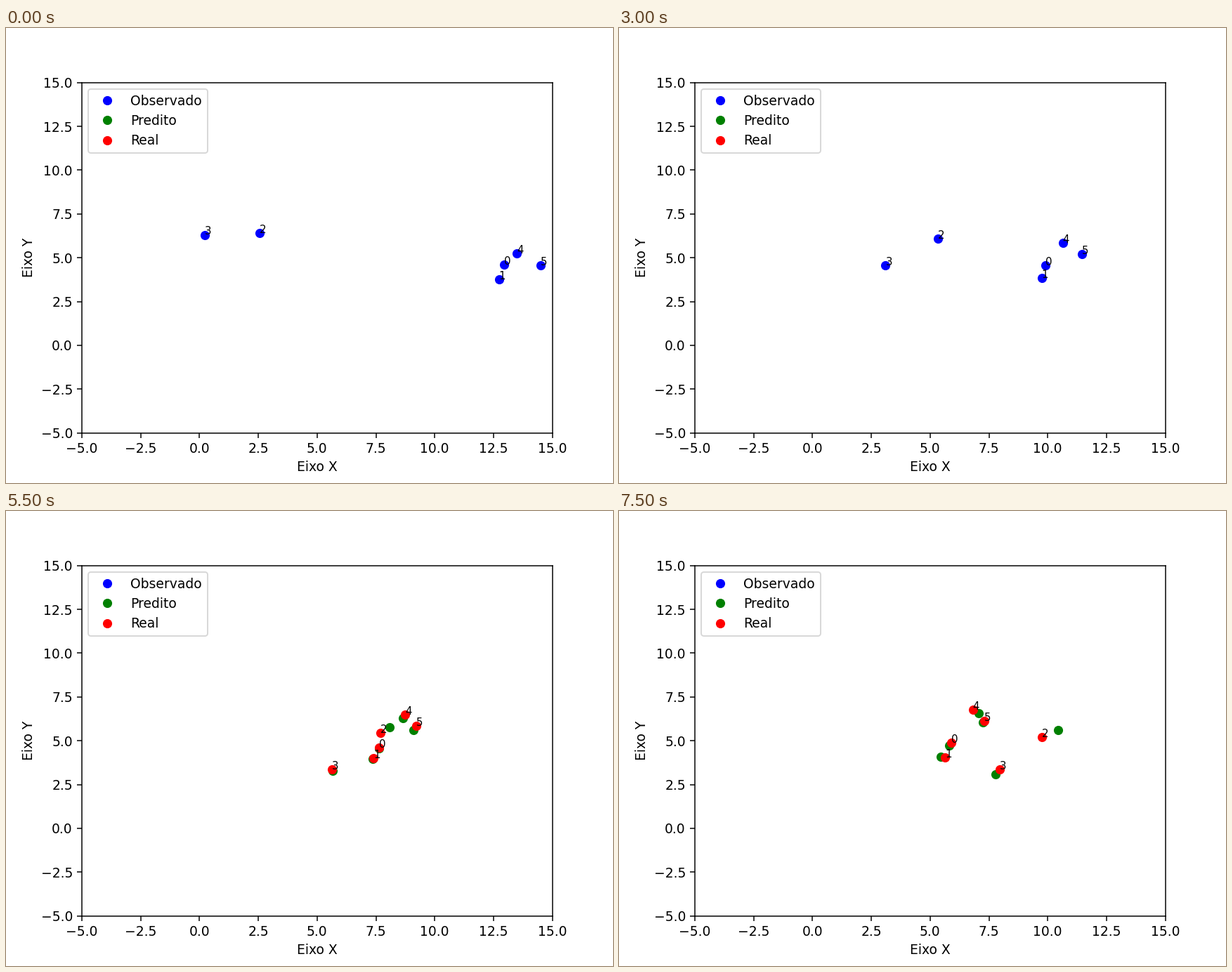
Animation of 864 by 648 pixels, one loop 8 s. Source, as a matplotlib script:

```python
import numpy as np
import matplotlib.pyplot as plt
from matplotlib.animation import FuncAnimation

W, H, DPI = 864, 648, 135
STEPS, OBSERVED = 16, 8
LOW, HIGH = -5, 15

# Agent positions in stage pixels (x, y down), one row per key step
REAL_STEPS = [0, 2, 6, 8, 10, 12, 15]
REAL_KEYS = [
    [(709.4, 337.4), (701.6, 358), (361, 291.5), (282.8, 294.5), (727.4, 320.6), (760.6, 338)],
    [(676, 337.5), (668, 356.5), (391.5, 295), (311, 313.5), (692.3, 314), (727, 328)],
    [(606.6, 337.5), (601.6, 355.6), (454.3, 300), (379.4, 338), (631.5, 305.7), (658.5, 322)],
    [(576, 339), (569.4, 355.4), (487, 304), (412.6, 352.6), (606.4, 300.5), (627.5, 319)],
    [(546, 338), (538.5, 352.6), (516.8, 312.5), (445.7, 363.5), (582, 293.6), (598, 312.5)],
    [(515.7, 335.7), (508.6, 352), (549, 318), (483, 370.5), (553, 287), (569, 300)],
    [(473.4, 329.5), (464, 351.4), (602.3, 322), (541.5, 367.5), (503.5, 283), (519.5, 299)],
]
PREDICTED_STEPS = [8, 10, 12, 15]
PREDICTED_KEYS = [
    [(576, 339), (569.4, 355.4), (489.4, 303), (412.8, 352.6), (604.6, 301.4), (626.6, 320)],
    [(546.4, 338.5), (537.5, 354.4), (526.6, 306.3), (447.5, 365.4), (578.4, 297), (595.5, 314.6)],
    [(515.8, 336.6), (505.6, 352), (565.4, 309.4), (483.5, 372.5), (551.5, 293.6), (563.6, 309.5)],
    [(470, 334), (457.5, 349.5), (624.5, 312.5), (535.7, 375.2), (511.7, 288.2), (517.6, 301.3)],
]


def smooth_track(steps, keys):
    """Return a function giving all positions at a step, by cubic Hermite."""
    steps, keys = np.array(steps, float), np.array(keys, float)
    slopes = np.gradient(keys, steps, axis=0, edge_order=2)

    def at(step):
        i = min(np.searchsorted(steps, step, side="right") - 1, len(steps) - 2)
        span = steps[i + 1] - steps[i]
        s = (step - steps[i]) / span
        blend = s * s * (3 - 2 * s)
        return (keys[i] * (1 - blend) + keys[i + 1] * blend
                + span * s * (1 - s) * ((1 - s) * slopes[i] - s * slopes[i + 1]))

    return at


def to_data(pixels):
    """Stage pixels to axis units."""
    left, bottom, right, top = ax.get_position().extents
    x = (pixels[:, 0] / W - left) / (right - left)
    y = (1 - pixels[:, 1] / H - bottom) / (top - bottom)
    return LOW + (HIGH - LOW) * x, LOW + (HIGH - LOW) * y


real_at = smooth_track(REAL_STEPS, REAL_KEYS)
predicted_at = smooth_track(PREDICTED_STEPS, PREDICTED_KEYS)

fig, ax = plt.subplots(figsize=(W / DPI, H / DPI), dpi=DPI)
ax.set(xlim=(LOW, HIGH), ylim=(LOW, HIGH), xlabel="Eixo X", ylabel="Eixo Y")
ticks = np.arange(LOW, HIGH + 1, 2.5)
ax.set_xticks(ticks)
ax.set_yticks(ticks)

observed, = ax.plot([], [], "o", color="blue", label="Observado")
predicted, = ax.plot([], [], "o", color="green", label="Predito")
real, = ax.plot([], [], "o", color="red", label="Real")
ax.legend(loc="upper left")
labels = [ax.text(0, 0, str(n), fontsize=8) for n in range(6)]


def draw(step):
    x, y = to_data(real_at(step))
    if step < OBSERVED:
        observed.set_data(x, y)
        predicted.set_data([], [])
        real.set_data([], [])
    else:
        observed.set_data([], [])
        predicted.set_data(*to_data(predicted_at(step)))
        real.set_data(x, y)
    for label, position in zip(labels, zip(x, y)):
        label.set_position(position)
    return [observed, predicted, real, *labels]


anim = FuncAnimation(fig, draw, frames=STEPS, interval=500, repeat=True,
                     repeat_delay=0, init_func=lambda: draw(0))
plt.show()
```
